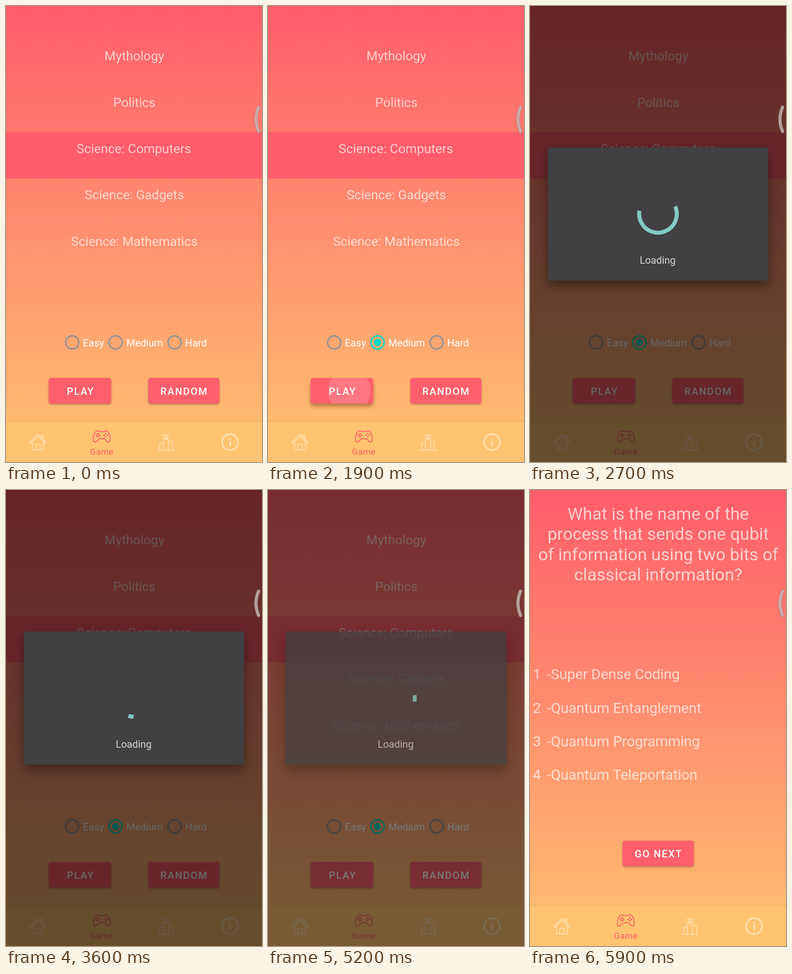
Write an HTML page that moves like this. It is 561 by 998 pixels and loops after 6000 ms.

```html
<!DOCTYPE html>
<html lang="en">
<head>
<meta charset="utf-8">
<title>Quiz game</title>
<style>
  html, body { margin: 0; width: 100%; height: 100%; overflow: hidden; background: #ff5f6d; }
  svg { display: block; width: 561px; height: 998px; font-family: Roboto, sans-serif; }
  .mid { text-anchor: middle; }
  .soft { fill: #fff; fill-opacity: .68; }
  .list { font-size: 28.2px; }
  .question { font-size: 37.7px; }
  .answers { font-size: 31.4px; }
  .labels { font-size: 22px; fill: #fff; }
  .caps { font-size: 22px; font-weight: 500; letter-spacing: 1.95px; fill: #fff; }
  .btn { fill: #ff5f6d; filter: drop-shadow(0 2px 2px rgba(60, 20, 0, .38)); }
  .ring { fill: none; stroke: #929292; stroke-width: 3.2; }
  .icon { fill: none; stroke: #fff; stroke-opacity: .55; stroke-width: 1.4; stroke-linejoin: round; stroke-linecap: round; }
  .nav { fill: #ffc371; filter: drop-shadow(0 -1px 1px rgba(90, 40, 0, .12)); }
  .box { fill: #424042; filter: drop-shadow(0 11px 12px rgba(0, 0, 0, .38)); }
</style>
</head>
<body>
<svg viewBox="0 0 561 998">
  <defs>
    <linearGradient id="sky" x2="0" y2="1">
      <stop stop-color="#ff5d6c"/>
      <stop offset="1" stop-color="#ffc371"/>
    </linearGradient>
    <clipPath id="playClip"><rect x="93.5" y="814" width="137" height="56" rx="5"/></clipPath>
  </defs>

  <rect width="561" height="998" fill="url(#sky)"/>

  <g id="menu">
    <rect y="276" width="561" height="101.5" fill="#ff5d6c"/>
    <g class="mid soft list">
      <text x="281.3" y="119.4">Mythology</text>
      <text x="281.3" y="220.7">Politics</text>
      <text x="280.3" y="322">Science: Computers</text>
      <text x="281.3" y="423.3">Science: Gadgets</text>
      <text x="281.3" y="524.6">Science: Mathematics</text>
    </g>
    <circle id="radioRipple" cx="240" cy="736.3" fill="#03dac5"/>
    <circle class="ring" cx="145" cy="736.3" r="14.4"/>
    <circle class="ring" id="ring" cx="240" cy="736.3" r="14.4"/>
    <circle class="ring" cx="369.5" cy="736.3" r="14.4"/>
    <circle id="dot" cx="240" cy="736.3" fill="#03dac5"/>
    <g class="labels">
      <text x="168.6" y="745">Easy</text>
      <text x="263.8" y="745">Medium</text>
      <text x="392.8" y="745">Hard</text>
    </g>
    <rect class="btn" id="play" x="93.5" y="814" width="137" height="56" rx="5"/>
    <circle id="playRipple" cy="842" fill="#fff" clip-path="url(#playClip)"/>
    <rect class="btn" x="312" y="814" width="155.5" height="56" rx="5"/>
    <g class="caps mid">
      <text x="163.5" y="851">PLAY</text>
      <text x="390.5" y="851">RANDOM</text>
    </g>
  </g>

  <g id="quiz">
    <g class="mid soft question">
      <text x="281" y="65">What is the name of the</text>
      <text x="281" y="109.4">process that sends one qubit</text>
      <text x="281" y="153.8">of information using two bits of</text>
      <text x="281" y="198.2">classical information?</text>
    </g>
    <g class="soft answers" id="answers"></g>
    <rect class="btn" x="203" y="767.5" width="156" height="56" rx="5"/>
    <text class="caps mid" x="281.8" y="804.3">GO NEXT</text>
  </g>

  <rect class="nav" y="910" width="561" height="88"/>
  <g class="icon">
    <path d="M52 955 70 937.500 88 955 86 957 70 941.500 54 957ZM58 954V971.500H82V954M65 971V959.500H75V971M76 943V939H81V948"/>
    <path d="M332 972H370M336.500 971V957H345V971M345 957V948H356V971M356 953H365V971"/>
    <path d="M351 936.500l1.600 3.300 3.500.5-2.600 2.500.7 3.500-3.200-1.700-3.200 1.700.7-3.500-2.600-2.500 3.500-.5ZM342 938l2 1M360 938l-2 1M342 945l2-1M360 945l-2-1"/>
    <circle cx="491" cy="954.500" r="17.500" stroke-width="2.800"/>
    <path d="M491 953V962M491 947.200V947.500" stroke-width="3.200"/>
  </g>
  <g fill="none" stroke="#ff5f6d" stroke-width="1.900" stroke-linejoin="round">
    <path d="M200 930C203 929 204 931.500 207 931.500H213C216 931.500 217 929 220 930C226 931 229 942 228.500 950C228 956 222 955 219 950.500C217 947.500 216 947 213 947H207C204 947 203 947.500 201 950.500C198 955 192 956 191.500 950C191 942 194 931 200 930Z"/>
    <path d="M200.200 935.500h2.600v2.800h2.800v2.600h-2.800v2.800h-2.600v-2.800h-2.800v-2.600h2.800Z" stroke-width="1.500"/>
  </g>
  <g fill="#ff5f6d">
    <circle cx="218.500" cy="936" r="1.700"/><circle cx="218.500" cy="943" r="1.700"/>
    <circle cx="215" cy="939.500" r="1.700"/><circle cx="222" cy="939.500" r="1.700"/>
    <text class="mid" x="210" y="982" font-size="18.700" letter-spacing=".65">Game</text>
  </g>

  <rect id="dim" width="561" height="998"/>
  <g id="dialog">
    <rect class="box" x="39" y="309.500" width="483" height="291.500" rx="3"/>
    <circle id="spinner" cx="280.500" cy="455" r="41.200" fill="none" stroke="#80cbc4" stroke-width="8.700" pathLength="360"/>
    <text class="mid" x="279.700" y="564" font-size="22" fill="#d6d5d6">Loading</text>
  </g>

  <g fill="none" stroke-linecap="round">
    <path d="M553.500 221.500Q542 248 553.500 274.500" stroke="#7a4a4a" stroke-opacity=".35" stroke-width="8.500"/>
    <path d="M553.500 221.500Q542 248 553.500 274.500" stroke="#c8bebc" stroke-opacity=".78" stroke-width="6.800"/>
  </g>
</svg>
<script>
const LOOP = 6000, STEP = 100;
const $ = id => document.getElementById(id);
const set = (id, attrs) => {
  for (const name in attrs) $(id).setAttribute(name, attrs[name]);
};

$('answers').innerHTML = ['Super Dense Coding', 'Quantum Entanglement', 'Quantum Programming', 'Quantum Teleportation']
  .map((text, i) => {
    const y = 414.3 + i * 73.3;
    return `<text x="6.3" y="${y}">${i + 1}</text><text x="37" y="${y}">-${text}</text>`;
  }).join('');

// Linear track through time, value pairs.
function track(t, ...keys) {
  if (t <= keys[0]) return keys[1];
  for (let i = 2; i < keys.length; i += 2) {
    if (t <= keys[i]) {
      const k = (t - keys[i - 2]) / (keys[i] - keys[i - 2]);
      return keys[i - 1] + (keys[i + 1] - keys[i - 1]) * k;
    }
  }
  return keys[keys.length - 1];
}

// Cubic ease with y handles at 0 and 1; x handles are given.
function ease(x, x0, x1, x2, x3) {
  if (x <= x0) return 0;
  if (x >= x3) return 1;
  let lo = 0, hi = 1;
  for (let i = 0; i < 24; i++) {
    const s = (lo + hi) / 2, r = 1 - s;
    const at = x0 * r * r * r + 3 * x1 * s * r * r + 3 * x2 * s * s * r + x3 * s * s * s;
    if (at < x) lo = s; else hi = s;
  }
  return lo * lo * (3 - 2 * lo);
}

function spin(t) {
  const time = Math.max(0, Math.min((t - 2500) * 1.01 + 115, 2735));
  const p = time % 1333 / 1333, cap = 6;
  const tail = 270 * ease(p, .5, .7, .6, 1);
  const head = 270 * ease(p, 0, .2, .1, .5);
  const turn = -90 + 90 * p + time * 720 / 4444;
  set('spinner', {
    'stroke-dasharray': `${head - tail + 2 * cap} 360`,
    transform: `rotate(${turn + tail - cap} 280.5 455)`
  });
}

function render(t) {
  const asking = t >= 5400;
  set('menu', { display: asking ? 'none' : 'inline' });
  set('quiz', { display: asking ? 'inline' : 'none' });

  set('radioRipple', {
    r: track(t, 550, 0, 800, 31),
    opacity: track(t, 550, 0, 650, .25, 900, .25, 1200, 0)
  });
  $('ring').style.stroke = t >= 700 ? '#03dac5' : '#929292';
  set('dot', { r: track(t, 650, 0, 850, 8) });

  set('playRipple', {
    cx: track(t, 1780, 190, 1900, 178, 2020, 162),
    r: track(t, 1750, 0, 1900, 47, 2020, 76),
    opacity: track(t, 1750, 0, 1800, .15, 2050, .15, 2300, 0)
  });
  const lift = track(t, 1750, 0, 1880, 1, 2050, 1, 2250, 0);
  $('play').style.filter = `drop-shadow(0 ${2 + 4 * lift}px ${2 + 2.5 * lift}px rgba(60, 20, 0, .38))`;

  set('dim', { opacity: track(t, 2400, 0, 2500, .12, 2600, .5, 2700, .6, 5100, .6, 5200, .53, 5300, .2, 5400, 0) });
  set('dialog', { opacity: track(t, 2400, 0, 2500, .62, 2600, 1, 5100, 1, 5200, .72, 5300, .1, 5400, 0) });
  spin(t);
}

const begin = performance.now();
function tick() {
  const t = (performance.now() - begin) % LOOP;
  render(Math.floor(t / STEP) * STEP);
  requestAnimationFrame(tick);
}
tick();
</script>
</body>
</html>
```
